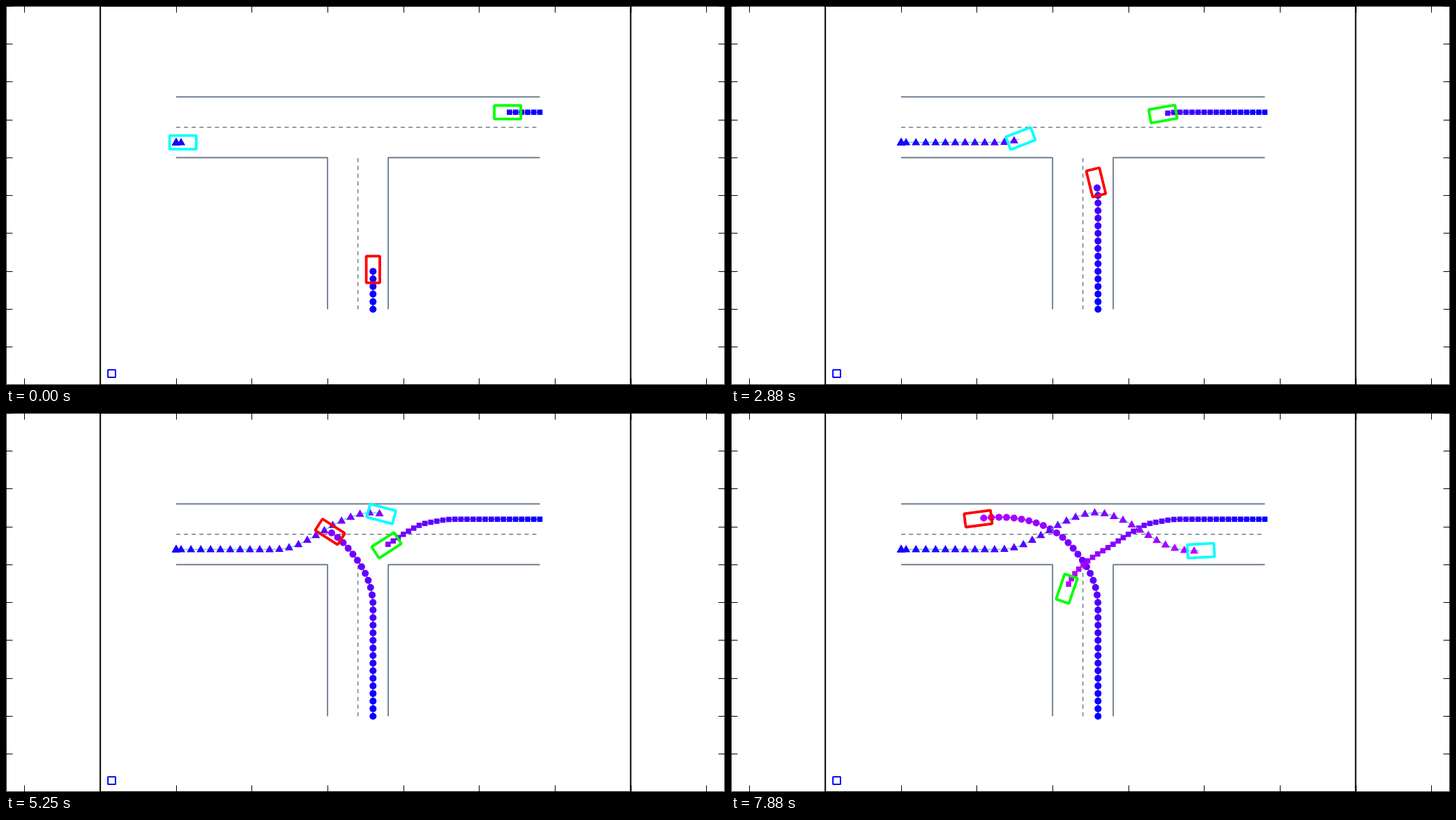
Recreate the animation shown at these times as an HTML page with a canvas. Size 1031x543 px, loop 8000 ms.

```html
<!DOCTYPE html>
<html>
<head>
<meta charset="utf-8">
<style>
  html, body { margin: 0; width: 100%; height: 100%; overflow: hidden; background: #fff; }
  canvas { display: block; }
</style>
</head>
<body>
<canvas id="stage" width="1031" height="543"></canvas>
<script>
const ctx = document.getElementById('stage').getContext('2d');
const FRAME_MS = 125, FRAMES = 64, FIRST = 5, DT = 0.5;

// Vehicles keep a constant speed; steer lists [time, turn in degrees] relative to the initial heading.
const vehicles = [
  { color: '#f00', trail: '#30f', shape: 'circle', x: 526.3, y: 434.5, heading: -90, speed: 10.87, departs: 0,
    steer: [[14.5, 0], [17.5, -18], [20.5, -34], [23.5, -41], [28.5, -70], [33.5, -89], [37, -98]] },
  { color: '#0f0', trail: '#30f', shape: 'square', x: 765.5, y: 152.2, heading: 180, speed: 8.7, departs: 0,
    steer: [[14, 0], [16.3, -10], [18.5, -10], [20.7, -29], [24.5, -34], [28.5, -31], [31, -38], [33.5, -49], [38, -79]] },
  { color: '#0ff', trail: '#30dce0', shape: 'triangle', x: 244, y: 195.4, heading: 0, speed: 14.1, departs: 4.5,
    steer: [[14.4, 0], [17.5, -27], [20.5, -32], [24, -15], [26.5, 17.5], [29.5, 33], [32, 31], [36.5, -3]] }
];

function headingAt({ heading, steer }, time) {
  const next = steer.findIndex(([t]) => t > time);
  let turn = 0;
  if (next < 0) turn = steer[steer.length - 1][1];
  else if (next > 0) {
    const [t0, a0] = steer[next - 1], [t1, a1] = steer[next];
    turn = a0 + (a1 - a0) * (time - t0) / (t1 - t0);
  }
  return (heading + turn) * Math.PI / 180;
}

// The route holds one position for every DT of driving.
for (const v of vehicles) {
  let { x, y } = v;
  v.route = [[x, y]];
  for (let t = 0; t < FIRST + FRAMES * DT; t += DT) {
    const distance = t < v.departs ? 0 : v.speed * DT;
    const angle = headingAt(v, t + DT / 2);
    x += distance * Math.cos(angle);
    y += distance * Math.sin(angle);
    v.route.push([x, y]);
  }
}

function line(color, width, ...points) {
  ctx.strokeStyle = color;
  ctx.lineWidth = width;
  ctx.beginPath();
  points.forEach(([x, y]) => ctx.lineTo(x, y));
  ctx.stroke();
}

function box(color, width, x, y, w, h) {
  ctx.strokeStyle = color;
  ctx.lineWidth = width;
  ctx.strokeRect(x, y, w, h);
}

function drawScene() {
  ctx.fillStyle = '#fff';
  ctx.fillRect(0, 0, 1031, 543);
  box('#333', 1, 0.5, 0.5, 1030, 542);
  for (let i = 0; i < 10; i++) {
    const x = Math.round(26.4 + i * 108.65) + 0.5, y = Math.round(i * 54.3 - 0.3) + 0.5;
    line('#000', 1, [x, 0], [x, 9.5]);
    line('#000', 1, [x, 533.5], [x, 543]);
    line('#000', 1, [0, y], [9.5, y]);
    line('#000', 1, [1021.5, y], [1031, y]);
  }
  box('#000', 2, 135.2, 0, 760.5, 543);

  const road = '#708090';
  line(road, 1.9, [244, 130.2], [765.5, 130.2]);
  line(road, 1.9, [244, 217.2], [461.1, 217.2], [461.1, 434.4]);
  line(road, 1.9, [765.5, 217.2], [548.1, 217.2], [548.1, 434.4]);
  ctx.setLineDash([6, 5.1]);
  line(road, 1.5, [244, 173.8], [765.5, 173.8]);
  line(road, 1.5, [504.6, 218], [504.6, 434.4]);
  ctx.setLineDash([]);
  box('#00f', 2, 146.2, 521.2, 10.8, 10.8);
}

function drawMarker(shape, x, y) {
  ctx.beginPath();
  if (shape === 'circle') ctx.arc(x, y, 5, 0, 2 * Math.PI);
  else if (shape === 'square') ctx.rect(x - 3.8, y - 3.8, 7.6, 7.6);
  else {
    ctx.moveTo(x, y - 6.5);
    ctx.lineTo(x + 6, y + 4);
    ctx.lineTo(x - 6, y + 4);
  }
  ctx.fill();
}

function drawTrail({ trail, shape, route }, time) {
  line(trail, 1.2, ...route.slice(0, time / DT + 1));
  for (let k = 0; k <= time; k++) {
    ctx.fillStyle = `rgb(${k * 5.2}, 0, 255)`;
    drawMarker(shape, ...route[k / DT]);
  }
}

function drawCar(vehicle, time) {
  ctx.save();
  ctx.translate(...vehicle.route[time / DT]);
  ctx.rotate(headingAt(vehicle, time + 0.3));
  box(vehicle.color, 3.8, -16.4, -9.7, 38.2, 19.4);
  ctx.restore();
}

function draw(now) {
  const time = FIRST + Math.floor(now / FRAME_MS) % FRAMES * DT;
  ctx.lineJoin = 'bevel';
  drawScene();
  vehicles.forEach(v => drawTrail(v, time));
  vehicles.forEach(v => drawCar(v, time));
  requestAnimationFrame(draw);
}
draw(0);
</script>
</body>
</html>
```
